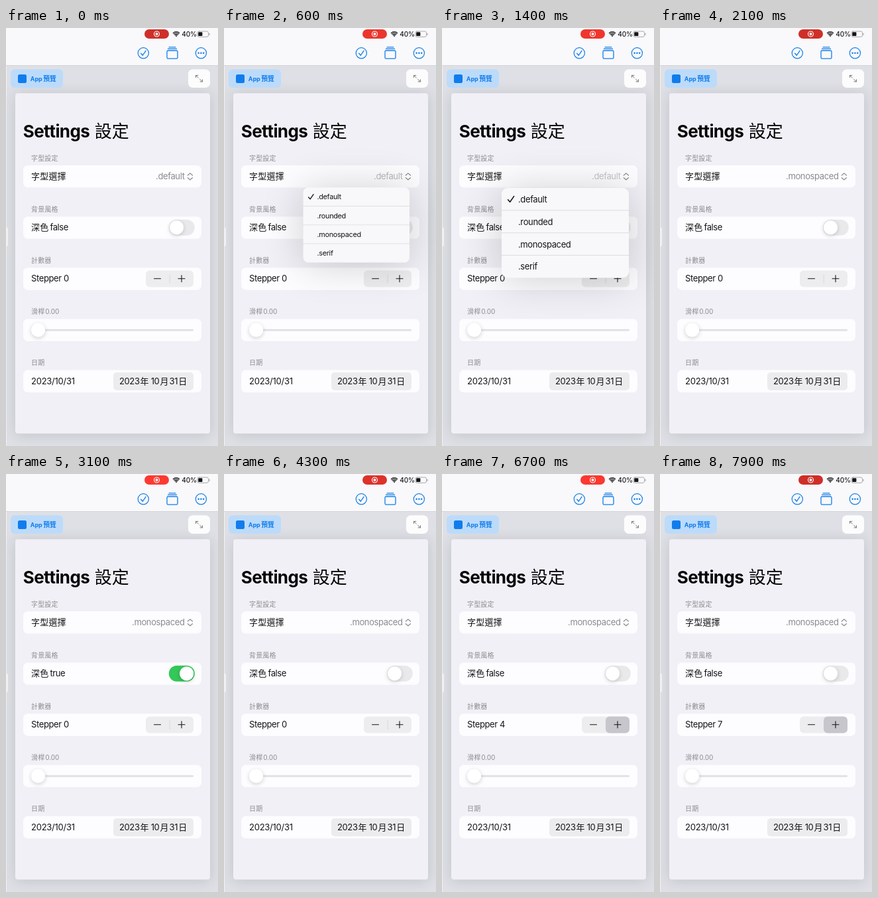
An HTML page with a canvas that plays this animation: 320x630 px, repeating every 8000 ms.

```html
<!DOCTYPE html>
<html lang="zh-Hant">
<head>
<meta charset="utf-8">
<title>Settings 設定</title>
<style>
html, body { margin: 0; width: 320px; height: 630px; overflow: hidden; background: #dcdfe4; }
canvas { display: block; width: 320px; height: 630px; }
</style>
</head>
<body>
<canvas id="stage"></canvas>
<script>
const LOOP = 8000;
const FONT = 'Inter, "Noto Sans CJK TC", "Noto Sans CJK JP", sans-serif';
const BLUE = '#117cec', INK = '#151517', GREY = '#8b8b8f';
const canvas = document.getElementById('stage');
const dpr = window.devicePixelRatio || 1;
canvas.width = 320 * dpr;
canvas.height = 630 * dpr;
const ctx = canvas.getContext('2d');

const clamp = v => Math.max(0, Math.min(1, v));
const ease = v => 1 - Math.pow(1 - clamp(v), 3);
const smooth = v => { v = clamp(v); return v * v * (3 - 2 * v); };
const mix = (a, b, k) => 'rgb(' + a.map((v, i) => Math.round(v + (b[i] - v) * k)) + ')';

function box(x, y, w, h, r, fill) {
  ctx.beginPath();
  ctx.roundRect(x, y, w, h, r);
  ctx.fillStyle = fill;
  ctx.fill();
}

function disc(x, y, r, fill) {
  ctx.beginPath();
  ctx.arc(x, y, r, 0, Math.PI * 2);
  ctx.fillStyle = fill;
  ctx.fill();
}

function ring(x, y, r, color, width) {
  ctx.beginPath();
  ctx.arc(x, y, r, 0, Math.PI * 2);
  ctx.strokeStyle = color;
  ctx.lineWidth = width;
  ctx.stroke();
}

function line(points, color, width) {
  ctx.beginPath();
  for (let i = 0; i < points.length; i += 2) ctx.lineTo(points[i], points[i + 1]);
  ctx.strokeStyle = color;
  ctx.lineWidth = width;
  ctx.stroke();
}

function text(str, x, y, { size = 13, weight = 400, color = INK, gap = 0, align = 'left' } = {}) {
  ctx.font = `${weight} ${size}px ${FONT}`;
  ctx.letterSpacing = gap + 'px';
  ctx.textAlign = align;
  ctx.fillStyle = color;
  ctx.fillText(str, x, y);
}

const label = (str, x, y, opts) => text(str, x, y, { gap: -0.38, ...opts });
const han = (str, x, y) => text(str, x, y, { gap: 0.2 });

function shadow(color, blur, dy, draw) {
  ctx.save();
  ctx.shadowColor = color;
  ctx.shadowBlur = blur * dpr;
  ctx.shadowOffsetY = dy * dpr;
  draw();
  ctx.restore();
}

function statusBar(t) {
  const glow = 0.5 - 0.5 * Math.cos((t - 50) / 1950 * Math.PI * 2);
  box(209, 2, 37, 14, 7, mix([206, 47, 41], [255, 58, 49], glow));
  ring(227.5, 9, 4, '#fff', 1.1);
  disc(227.5, 9, 2, '#fff');

  for (const r of [2.6, 4.6, 6.6]) {
    ctx.beginPath();
    ctx.arc(257, 12.3, r, -Math.PI * 0.75, -Math.PI * 0.25);
    ctx.strokeStyle = INK;
    ctx.lineWidth = 1.3;
    ctx.stroke();
  }
  disc(257, 12, 1, INK);
  text('40%', 265.3, 12.7, { size: 10, weight: 500, gap: -0.1 });

  ctx.beginPath();
  ctx.roundRect(288.9, 5, 16.6, 8.4, 2.4);
  ctx.strokeStyle = '#a0a0a3';
  ctx.lineWidth = 0.9;
  ctx.stroke();
  box(290.2, 6.3, 6.2, 5.8, 1.2, INK);
  box(306.5, 7.6, 1.1, 3.2, 0.6, '#a0a0a3');
}

function toolbar() {
  ctx.fillStyle = '#f9f9fb';
  ctx.fillRect(0, 0, 320, 56.5);
  ctx.fillStyle = '#c9cacf';
  ctx.fillRect(0, 56.3, 320, 0.7);
  ring(207.3, 37.8, 8.1, BLUE, 1.2);
  line([203.7, 38.3, 206.3, 41.2, 211, 34.3], BLUE, 1.3);
  ctx.beginPath();
  ctx.roundRect(243, 34, 16, 12.2, 1.8);
  ctx.stroke();
  line([244.4, 31.4, 257.6, 31.4], BLUE, 1.1);
  line([246, 28.9, 256, 28.9], BLUE, 1.1);
  ring(294.4, 37.8, 8.1, BLUE, 1.2);
  for (const dx of [-3.8, 0, 3.8]) disc(294.4 + dx, 37.8, 1.25, BLUE);
}

function previewBar() {
  box(7, 62.3, 79, 27.7, 6, '#bcdbfa');
  box(18, 70, 13, 13, 2.5, BLUE);
  text('App', 36.8, 80, { size: 9, weight: 700, color: BLUE, gap: -0.1 });
  text('預覽', 56.2, 80, { size: 9.8, weight: 700, color: BLUE });

  box(275, 62.3, 33, 27.7, 7, '#fcfcfd');
  const c = '#77797d';
  line([290.3, 75, 286.4, 71.4], c, 1);
  line([286.4, 74.8, 286.4, 71.4, 289.9, 71.4], c, 1);
  line([292.5, 77.2, 296.5, 80.9], c, 1);
  line([296.5, 77.5, 296.5, 80.9, 293, 80.9], c, 1);
}

function backdrop() {
  ctx.fillStyle = '#dee0e5';
  ctx.fillRect(0, 0, 320, 630);
  ctx.fillStyle = '#f1f2f5';
  ctx.fillRect(0, 57, 1, 573);
  box(-3, 300.5, 6, 28.5, 2, '#f4f4f7');
  shadow('rgba(40,45,60,.16)', 20, 2, () => box(14, 98.3, 294, 513, 4, '#f1f0f6'));
  toolbar();
  previewBar();
}

function knob(x, y, r) {
  shadow('rgba(0,0,0,.18)', 6, 1.8, () => disc(x, y, r, '#fff'));
}

function form(t, s) {
  text('Settings', 25.8, 164.8, { size: 26, weight: 700, color: '#050506', gap: -0.65 });
  text('設定', 133.8, 164.6, { size: 26, weight: 500, color: '#050506' });

  ['字型設定', '背景風格', '計數器', '滑桿', '日期'].forEach((name, i) => {
    const y = 207 + i * 77.15;
    text(name, 38, y - 7.5, { size: 10, color: GREY, gap: 0.15 });
    box(26, y, 269, 33.6, 7, '#fdfcfe');
  });
  text('0.00', 59.3, 431.1, { size: 10, color: GREY, gap: -0.1 });

  // font picker
  han('字型選擇', 38, 227.9);
  ctx.globalAlpha = 1 - 0.5 * s.menu;
  label(s.font, 269.5, 228.3, { color: GREY, align: 'right' });
  ctx.globalAlpha = 1;
  line([274.3, 222, 277.9, 218.9, 281.5, 222], GREY, 1.2);
  line([274.3, 225.7, 277.9, 228.8, 281.5, 225.7], GREY, 1.2);

  // switch
  han('深色', 38, 305);
  label(String(s.dark), 66.4, 305.2);
  box(245.8, 288.8, 39, 24, 12, mix([233, 233, 235], [52, 199, 89], s.toggle));
  knob(257.5 + 15.2 * s.toggle, 300.8, 10.6);

  // stepper
  label('Stepper ' + s.count, 38, 382.4);
  box(211, 365.5, 72, 25, 6, '#ededef');
  if (s.press < 1) line([247.2, 371.5, 247.2, 384.5], '#d4d4d8', 0.8);
  if (s.press > 0) box(247, 365.5, 36, 25, 6, '#c7c6cc');
  line([223.5, 377.8, 233.5, 377.8], INK, 1.1);
  line([260, 377.8, 270, 377.8], INK, 1.1);
  line([265, 372.8, 265, 382.8], INK, 1.1);

  // slider
  box(38, 453.8, 245, 3, 1.5, '#e2e1e5');
  knob(48.6, 455.2, 10.6);

  // date
  label('2023/10/31', 38, 536.8, { gap: -0.25 });
  box(162, 519, 121, 27, 5, '#ecebee');
  const parts = [['2023', 171], ['年', 202.6], ['10', 218.7], ['月', 232.6], ['31', 246.6], ['日', 260.2]];
  for (const [str, x] of parts) label(str, x, 536.8);
}

function menu(k) {
  if (k <= 0) return;
  const scale = 0.25 + 0.75 * k;
  ctx.save();
  ctx.globalAlpha = clamp(k * 1.3);
  ctx.translate(270, 236);
  ctx.scale(scale, scale);
  ctx.translate(-270, -236);
  shadow('rgba(0,0,0,.19)', 62, 3, () => box(90, 241, 192, 135.5, 9, '#f8f7f9'));
  ['.default', '.rounded', '.monospaced', '.serif'].forEach((name, i) => {
    const y = 241 + i * 33.85;
    label(name, 115, y + 21.8);
    if (i) line([90, y, 282, y], '#d6d5d9', 0.8);
  });
  line([99.6, 258.8, 102.6, 262.2, 108.6, 253.6], INK, 1.6);
  ctx.restore();
}

function stateAt(t) {
  return {
    menu: ease((t - 450) / 380) * (1 - smooth((t - 1600) / 320)),
    font: t >= 1600 ? '.monospaced' : '.default',
    dark: t >= 2650 && t < 3850,
    toggle: smooth((t - 2650) / 280) - smooth((t - 3850) / 280),
    press: t >= 5300 ? 1 : 0,
    count: t < 5300 ? 0 : 1 + Math.floor((t - 5300) / 410)
  };
}

function draw(t) {
  const s = stateAt(t);
  ctx.setTransform(dpr, 0, 0, dpr, 0, 0);
  ctx.lineCap = ctx.lineJoin = 'round';
  backdrop();
  statusBar(t);
  form(t, s);
  menu(s.menu);
}

const start = performance.now();
function tick() {
  draw((performance.now() - start) % LOOP);
  requestAnimationFrame(tick);
}
tick();
</script>
</body>
</html>
```
